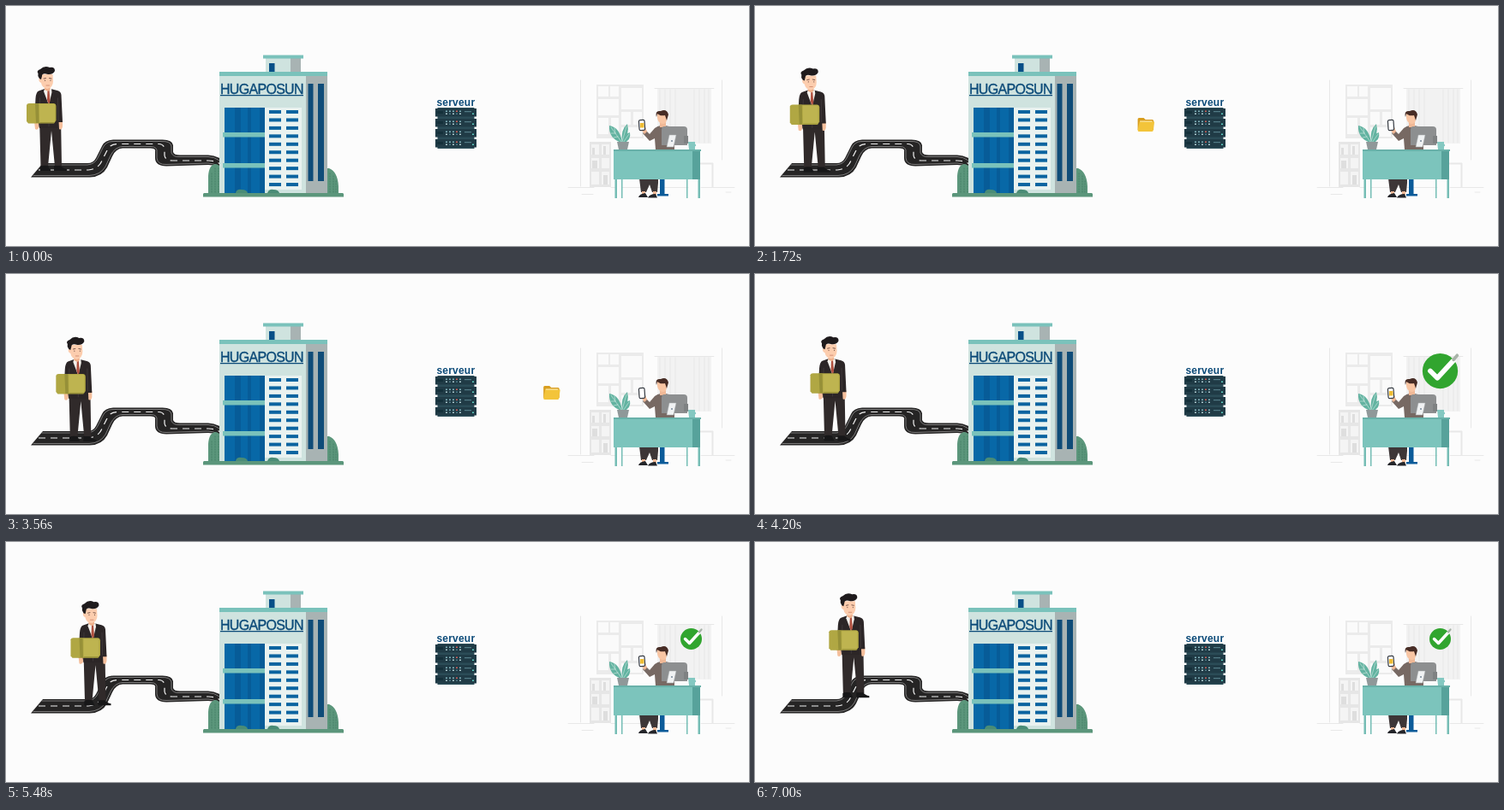
An HTML page for the animation above (7.04 s loop, 867 px wide and 281 px high).

```html
<!DOCTYPE html>
<html lang="fr">
<head>
<meta charset="utf-8">
<title>Envoi du dossier</title>
<style>
html, body { margin: 0; width: 100%; height: 100%; overflow: hidden; background: #fcfcfc; }
svg { display: block; width: 867px; height: 281px; }
text { font-family: "Liberation Sans", Arial, sans-serif; fill: #0b4a78; }
.line { fill: none; stroke-linecap: round; stroke-linejoin: round; }
.dash { stroke-linecap: butt; }
</style>
</head>
<body>
<svg viewBox="0 0 867 281" xmlns="http://www.w3.org/2000/svg">
  <g id="road">
    <path fill="#252424" d="M43 184H95Q102 184 105 178L112 164Q115 157 125 156.500H181Q194 156 195 163V171Q196 174.500 203 174.500H236Q253 175 258 191L250 192Q247 186 236 186L187 187.500Q174 187 174 178V170Q175 166.500 168 166.500H136Q128 167 124 176L118 189Q112 200 98 200.500H29Z"/>
    <g class="line" stroke="#a3a1a1" stroke-width=".7">
      <path d="M42 186H95Q104 185 107 178L113.500 165Q117 159 124 158.500H181Q192 158 193 164V172Q195 177 203 176.500H236Q250 177 255 190"/>
      <path d="M32 198.500H97Q110 198 116 188L122 175Q127 165 136 164.500H169Q177 165 176 171V178Q177 186 187 185.500L236 184Q248 185 252 191"/>
      <path class="dash" stroke="#f2f2f2" stroke-width="1.200" stroke-dasharray="8 6" d="M38 192H96Q108 191 112 181L118 169Q121 161.500 131 161.500H178Q185 162 185 168V175Q186 181 194 181H236Q249 181 254 190"/>
    </g>
  </g>

  <g id="server">
    <text x="502.500" y="117" font-size="12" font-weight="bold" letter-spacing=".2">serveur</text>
  </g>

  <g id="folder">
    <path fill="#d99e1f" d="M-9.500 -6.500Q-9.500 -8 -8 -8H-2.500L-.5 -6H7.500Q9 -6 9 -4.500V6H-9.500Z"/>
    <path fill="#fff3c4" d="M-7 -4.500H7.500V3H-7Z"/>
    <path fill="#f3c43a" d="M-7.500 -3.500H10L8.500 7Q8.300 8 7 8H-8Q-9.500 8 -9.500 6.500Z"/>
  </g>

  <g id="building">
    <path fill="#5b967b" d="M236 220V199Q237 185 245 185Q255 188 256 204V220ZM364 220V204Q368 189 377 190Q387 194 388 211V220Z"/>
    <g class="line" stroke="#3f7a62" stroke-width=".8" stroke-dasharray="1 2">
      <path d="M240 218V196M244 218V189M248 218V189M252 218V195M378 218V194M382 218V198M385 218V205"/>
    </g>
    <path fill="#cfe3df" d="M303 61H344V78H303Z"/>
    <path fill="#a8b3b3" d="M332 61H344V78H332Z"/>
    <path fill="#7ac2bb" d="M300 57.500H347V61.500H300Z"/>
    <path fill="#074f87" d="M307 67H313.500V77H307Z"/>
    <path fill="#a8b3b3" d="M350 82H375V219H350Z"/>
    <path fill="#0f4c78" d="M352.500 91H358.500V205H352.500ZM364 91H371V205H364Z"/>
    <path fill="#cfe3df" d="M249 82H350V219H249Z"/>
    <path fill="#e9f2f0" d="M302 119H345V215H302Z"/>
    <path fill="#0868a7" d="M255 119H302V219H255Z"/>
    <path fill="#075c98" d="M267 119H274V219H267ZM282 119H286V219H282ZM296 119H302V219H296Z"/>
    <path fill="#7ac2bb" d="M249 77H375V82H249ZM253 148H302V153.500H253ZM253 184H302V189.500H253Z"/>
    <g id="windows" fill="#0b64a0"></g>
    <path fill="#4a8c76" d="M268 219Q269 214 275 215Q281 215 282 219ZM305 219Q307 214 312 215Q318 215 319 219Z"/>
    <path fill="#5b967b" d="M231 219H393L394 220V223.500H230V220Z"/>
    <text x="250" y="102.500" font-size="16" letter-spacing="-.7" stroke="#0b4a78" stroke-width=".35">HUGAPOSUN</text>
    <path fill="#0b4a78" d="M250 104H347V105.300H250Z"/>
  </g>

  <g id="office">
    <g class="line" stroke="#e8e8e8" stroke-width="1">
      <path d="M670.500 87V211M835.500 87V180M656 212.500H686M706 212.500H711M719 212.500H796M811 212.500H850M672 220.500H685M840 218H846"/>
      <path d="M810 184.500H824.500V212" stroke-width="2"/>
    </g>
    <path fill="#ebebeb" d="M689 92H744V155H689Z"/>
    <path fill="#fafafa" d="M691 94H703V106H691ZM705 94H715V106H705ZM718 96H742V121H718ZM691 109H715V128H691ZM718 124H729V139H718ZM732 124H742V139H732ZM691 131H703V150H691ZM706 131H715V150H706ZM718 142H742V153H718Z"/>
    <path fill="#f2f2f2" d="M760 96H823V161H760Z"/>
    <path class="line" stroke="#e7e7e7" d="M757 96.500H826M763 98V158M769 98V158M775 98V158M781 98V158M803 98V160M809 98V160M815 98V160M820 98V160"/>
    <path fill="#e6e6e6" d="M681 159H706V212H681Z"/>
    <path fill="#f4f4f4" d="M683 162H692V174H683ZM695 162H704V174H695ZM683 178H692V190H683ZM695 178H704V190H695ZM683 194H692V209H683ZM695 194H704V209H695Z"/>
    <path fill="#dedede" d="M684 166H687V174H684ZM697 164H700V174H697ZM684 181H690V190H684ZM697 198H702V209H697Z"/>

    <path fill="#0c5b99" d="M763 202H768.500V220H773V222.500H760V220H763Z"/>
    <path fill="#3d3637" d="M739 202H761V207L760 218H754L751 209L747 218H741Z"/>
    <path fill="#f0b997" d="M742 217H746V221H742ZM755 217H759V221H755Z"/>
    <path fill="#24252a" d="M738 224Q739 220 746 219L749 224ZM749 224.500Q751 220 758 220L760 224.500Z"/>

    <path fill="#776963" d="M757 143Q764 138 774 141Q780 145 780 168H758L757 155L751 158L743 149L747 146L751 150Z"/>
    <path fill="#f0b997" d="M763 134H770V142H763ZM741 144L746 142L748 147L745 150Z"/>
    <path fill="#f8c5a3" d="M760 126H771V132Q771 138 766 138Q761 137 760 131Z"/>
    <path fill="#472c25" d="M759 130Q757 122 764 123Q771 120 773 127L771 134L769 128Q763 129 760 126Z"/>
    <path fill="#8d8f90" d="M768 141H791Q795 141 795 145V163H765V145Q765 141 768 141Z"/>
    <path fill="#7f8283" d="M791 152H796V161H791Z"/>
    <path fill="#f0f2f3" stroke="#a9adae" stroke-width=".5" d="M774 151H782L779 165H771Z"/>
    <circle cx="777" cy="158" r="1" fill="#789"/>
    <rect x="738.700" y="133.500" width="6.600" height="12" rx="1.500" fill="#fff" stroke="#343941" stroke-width="1.200" transform="rotate(-4 742 139)"/>
    <path id="screen" fill="#efbd35" d="M740 137H744.500V142.500H740Z"/>

    <path fill="#63b3a1" d="M718 160Q703 155 704 140Q716 142 719 159ZM719 159Q717 145 725 138Q728 149 720 160ZM719 161Q721 150 728 148Q730 157 720 161Z"/>
    <path class="line" stroke="#d4ebe5" stroke-width=".6" d="M706 142L718 159M706 149L711 149M709 154L714 153M710 143L711 149M724 141L719 159M727 150L720 160"/>
    <path fill="#8f9899" d="M713 159H727L725 168H715Z"/>
    <path fill="#84c8c1" d="M796 159H804V168H797Z"/>
    <path class="line" stroke="#84c8c1" d="M803 161Q807 163 803 165"/>
    <path fill="#75bdb5" d="M710.500 201H713V225H710.500ZM718 201H719.500V225H718ZM794 201H795.500V225H794ZM807.500 201H810V225H807.500Z"/>
    <path fill="#7cc4bc" d="M709 168H810V203H709Z"/>
    <path fill="#57a29b" d="M801 170H810V203H801Z"/>
    <path fill="#69b1a9" d="M709 168H811V170H709Z"/>
  </g>

  <g id="check">
    <circle r="12.500" fill="#31a52f"/>
    <path class="line" stroke="#fff" stroke-width="3.500" d="M-7 0L-2 5L9 -7"/>
    <path class="line" stroke="#a8b3a8" stroke-width="2.300" d="M9.500 -8L12 -11"/>
  </g>

  <g id="man">
    <path fill="#302a2a" d="M39 130H64L65 188H57L53 146L49 188H40.500Z"/>
    <path fill="#171718" d="M40 193V188Q42 186 49 187L52 193ZM56 187H64Q66 190 71 191V193H56Z"/>
    <path fill="#f5bf9c" d="M33 135H38.500V142Q37 146 34 144ZM61.500 134H66V141Q65 146 62 144Z"/>
    <path fill="#2c2627" d="M45 97L38 99.500Q35 101 34.500 108L33 137H38L39 143H61V136H66L64.500 104Q64 100 60 99L52 97Z"/>
    <path class="line" stroke="#474042" stroke-width=".7" d="M39.500 108L39 141M60.500 108L61 134M50 117V141"/>
    <path fill="#f4f2ed" d="M45 97H53L53.500 101L50 116L44 100Z"/>
    <path fill="#b0503f" d="M48.500 99H50.500L51.500 111L50 116L48 110Z"/>
    <path fill="#efb08b" d="M45 92H51.500V98L49 100L45 98Z"/>
    <path fill="#fccdae" d="M40 80H54.500L55 88Q55 95 48.500 97Q42 96 41 90Q37 88 39 84Z"/>
    <path fill="#1f1b1d" d="M39 85Q36.500 82 37.500 79Q35 76 40 74Q45 69 51 72Q57 71 57 76Q55 80.500 49 80Q42 78 42 82L41 86Z"/>
    <path class="line" stroke="#5a3a33" stroke-width=".8" d="M44 85L46.500 84.500M50.500 84.500L53 85M45.500 87V87.500M52 87V87.500"/>
    <path class="line" stroke="#c4775f" stroke-width=".7" d="M47 93H50.500"/>
    <path fill="#b0a743" d="M24 116Q24.500 114 27 114H56Q58.500 114.500 58.500 117V134L56 137.500H26L24 135Z"/>
    <path fill="#beb450" d="M39 115H57V136H39Z"/>
    <path fill="#969038" d="M34 114H38L38.500 137H35Z"/>
    <path class="line" stroke="#918a36" stroke-width=".7" d="M40 136.500H56.500"/>
  </g>
</svg>
<script>
const LOOP = 7040, STEP = 40;
const $ = id => document.getElementById(id);

function rect(parent, x, y, width, height, fill) {
  const el = document.createElementNS('http://www.w3.org/2000/svg', 'rect');
  const attrs = { x, y, width, height };
  if (fill) attrs.fill = fill;
  for (const key in attrs) el.setAttribute(key, attrs[key]);
  parent.append(el);
}

for (let row = 0; row < 10; row++) {
  for (const x of [307, 327]) rect($('windows'), x, 122 + row * 9.45, 14, 4);
}

for (let unit = 0; unit < 4; unit++) {
  const y = 119 + unit * 12, box = $('server');
  rect(box, 503.5, y, 43, 12, '#2b4c57');
  rect(box, 501, y + 1, 48, 9.5, '#203b46');
  rect(box, 503, y + 4, 7, 3, '#14303a');
  for (let i = 0; i < 5; i++) {
    rect(box, 513 + i * 4, y + 3.5, 2, 1.5, i === 3 ? '#c9605a' : '#7fb0b8');
    rect(box, 513 + i * 4, y + 6.5, 2, 1.5, i % 2 ? '#4b7682' : '#a9c6ca');
  }
  rect(box, 535, y + 4, 8, 1.2, '#537c87');
  rect(box, 544, y + 6.5, 2, 1.5, '#5ecdc0');
}

// Each row: time, then values interpolated linearly.
const WALK = [
  [0, 0, 0], [720, 7, .5], [1480, 14.5, 1.3], [2200, 21.3, 2],
  [2920, 28.3, 2.7], [3600, 34.7, 3], [4320, 41.7, 2],
  [5040, 48, 0], [5760, 53.7, -3], [6480, 59, -7], [LOOP, 62.6, -11]
];
const TRIP = [[570, 742, .3], [690, 712, 1], [2300, 312, 1], [2310, 312, 1], [3850, 712, 1], [3965, 742, .3]];
const POP = [[4000, 0], [4200, 1.65], [4400, 1]];

function at(table, t) {
  const next = table.findIndex(row => row[0] > t);
  if (next < 0) return table[table.length - 1].slice(1);
  if (next === 0) return table[0].slice(1);
  const a = table[next - 1], b = table[next];
  const k = (t - a[0]) / (b[0] - a[0]);
  return a.slice(1).map((v, i) => v + (b[i + 1] - v) * k);
}

function place(id, x, y, scale = 1) {
  $(id).setAttribute('transform', `translate(${x} ${y}) scale(${scale})`);
}

function show(id, on) {
  $(id).setAttribute('visibility', on ? 'visible' : 'hidden');
}

function draw(t) {
  const [dx, dy] = at(WALK, t);
  const [x, size] = at(TRIP, t);
  const [pop] = at(POP, t);
  const travelling = t >= 570 && t < 3965;
  place('man', dx, dy);
  place('folder', x, 139, size);
  place('check', 799.5, 113.5, pop);
  show('folder', travelling);
  show('screen', !travelling);
  show('check', t > 4000);
}

const start = performance.now();
function tick() {
  const t = (performance.now() - start) % LOOP;
  draw(Math.floor(t / STEP) * STEP);
  requestAnimationFrame(tick);
}
draw(0);
requestAnimationFrame(tick);
</script>
</body>
</html>
```
